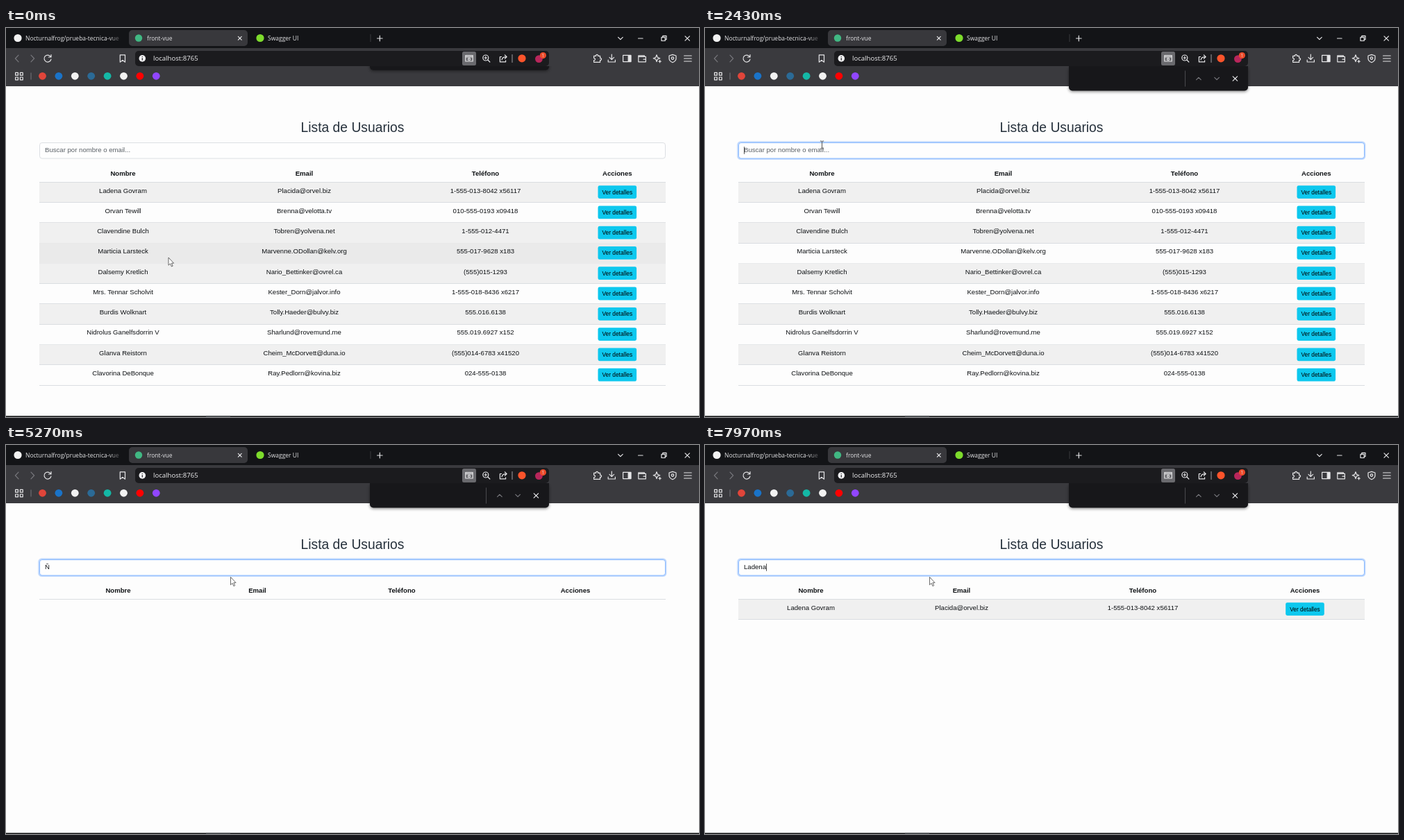
Write an HTML page that moves like this. It is 998 by 561 pixels and loops after 8000 ms.

```html
<!DOCTYPE html>
<html lang="es">
<head>
<meta charset="utf-8">
<title>front-vue</title>
<style>
  html, body { margin: 0; width: 100%; height: 100%; overflow: hidden; background: #fdfdfd; }
  svg { display: block; width: 100%; height: 100%; }
  text { font: 9.6px "Liberation Sans", Arial, sans-serif; fill: #0e1114; }
  .mid { text-anchor: middle; }
  .head { font-weight: bold; }
  .btn { font-size: 8.35px; fill: #000; }
  .title { font-size: 19.3px; fill: #26313c; }
  .hint { fill: #595f65; }
  .ui { font: 8.5px "Open Sans", "Noto Sans", sans-serif; fill: #e4e4e6; }
  .url { font-size: 9.6px; fill: #f0f0f2; }
  .ico { fill: none; stroke: #e6e6e8; stroke-width: 1.2; stroke-linecap: round; stroke-linejoin: round; }
  .dim { stroke: #77777c; }
</style>
</head>
<body>
<svg viewBox="0 0 998 561" preserveAspectRatio="none">
  <defs>
    <clipPath id="under"><rect x="510" y="55" width="290" height="60"/></clipPath>
    <linearGradient id="fade" x1="0" x2="1">
      <stop offset="0" stop-color="#131417" stop-opacity="0"/><stop offset="1" stop-color="#131417"/>
    </linearGradient>
    <filter id="soft" x="-10%" y="-50%" width="120%" height="200%"><feGaussianBlur stdDeviation="2.2"/></filter>
  </defs>
  <rect width="998" height="561" fill="#fdfdfd"/>

  <!-- page -->
  <text class="mid title" x="499" y="150">Lista de Usuarios</text>
  <rect id="ring" x="46.2" y="163.3" width="905.2" height="26.8" rx="5.2" fill="#c2dafe"/>
  <rect id="field" x="48.5" y="165.5" width="901" height="22.6" rx="3.4" fill="#fefefe" stroke="#dcdfe3"/>
  <text id="query" x="56" y="179.4"></text>
  <rect id="caret" y="171.2" width=".8" height="10.6" fill="#222"/>
  <g id="table"></g>

  <!-- tab strip -->
  <rect width="998" height="30" fill="#131417"/>
  <circle cx="17" cy="14.5" r="5.6" fill="#f2f2f2"/>
  <text class="ui" x="28" y="17.6">Nocturnalfrog/prueba-tecnica-vue</text>
  <rect x="148" y="4" width="20" height="22" fill="url(#fade)"/>
  <rect x="168" y="4" width="9" height="22" fill="#131417"/>
  <rect x="177" y="3" width="171" height="23" rx="5" fill="#38383c"/>
  <circle cx="191" cy="14.5" r="5.2" fill="#41b883"/>
  <text class="ui" x="203" y="17.6">front-vue</text>
  <circle cx="366" cy="14.5" r="5.6" fill="#7ddb2c"/>
  <text class="ui" x="377" y="17.6">Swagger UI</text>
  <path d="M525 9V20" stroke="#3a3a3e"/>
  <g class="ico">
    <path d="M334.4 12.4l4.8 4.8m0-4.8l-4.8 4.8M534.5 15h7.6M538.3 11.2v7.6"/>
    <path d="M881.6 13.4l3.3 3.3 3.3-3.3M910.5 15h6.6M978 11.8l6.4 6.4m0-6.4l-6.4 6.4"/>
    <path d="M944 13.3h5.2v5.2H944zM945.8 13v-1.6h5.2v5.2h-1.6"/>
  </g>

  <!-- toolbar -->
  <rect y="29" width="998" height="55" fill="#3a3a3e"/>
  <rect x="186" y="33" width="596" height="22" rx="5" fill="#1b1b1e"/>
  <g class="ico">
    <path class="dim" d="M18 39.2L13.4 44l4.6 4.8M36 39.2l4.6 4.8-4.6 4.8"/>
    <path d="M64.2 41.3a5 5 0 1 0 .7 3.8M65 38.6v3.4h-3.6"/>
    <path d="M164.3 38.8h7.2v10.4l-3.6-2.8-3.6 2.8z"/>
  </g>
  <circle cx="196.3" cy="43.9" r="4.8" fill="#f0f0f2"/>
  <path d="M196.3 43.3v3.2M196.3 41v.9" stroke="#1b1b1e" stroke-width="1.2"/>
  <text class="ui url" x="212" y="47.4">localhost:8765</text>
  <rect x="657" y="34" width="20" height="20" rx="2.5" fill="#6a6a6e"/>
  <g class="ico">
    <path d="M661.8 39.6h10.4v8.4h-10.4zM662 41.6h10"/><circle cx="667" cy="44.9" r="1.5"/>
    <circle cx="690.8" cy="43" r="4"/><path d="M693.8 46l3 3M689 43h3.6M690.8 41.2v3.6"/>
    <path d="M713.6 41.5h-2.2v7.4h8.2v-2M714 46c.4-3 2.4-4.4 6.6-4.4M718.4 39l2.8 2.6-2.8 2.6"/>
    <path d="M729 38.5v11" stroke="#8a8a8e"/>
  </g>
  <circle cx="743" cy="43.8" r="5.6" fill="#fb542b"/>
  <circle cx="767.4" cy="44.6" r="5.4" fill="#b8265b"/>
  <circle cx="773.4" cy="39.6" r="4.6" fill="#ee4b2b"/>
  <text class="mid ui" x="773.4" y="42" style="font-size:6.5px">1</text>
  <g class="ico">
    <path d="M846.6 40.4h3c-.6-2.8 3.6-2.8 3 0h3v3c2.6-.5 2.6 3.3 0 2.9v3h-9v-2.8c2.5.2 2.5-3.4 0-3z"/>
    <path d="M872.3 38v7.2M869 42.4l3.3 3.3 3.3-3.3M867.2 46v3h10.2v-3"/>
    <path d="M888.6 39.4H900v9.2h-11.4z"/><path d="M896.2 40h3.4v8h-3.4z" fill="#e6e6e8"/>
    <path d="M910.8 41.4v-1.6h8.6v1.6M910.8 41.4H921.4v7.4H910.8zM918 45.2h3.4"/>
    <path d="M937 38.8l1.3 3.6 3.5 1.3-3.5 1.3-1.3 3.6-1.3-3.6-3.5-1.3 3.5-1.3zM941.6 46.6v3.2M940 48.2h3.2"/>
    <path d="M960 38.4l5 1.6v4c0 3-2.2 4.6-5 5.8-2.8-1.2-5-2.8-5-5.8v-4z"/><circle cx="960" cy="43.6" r="1.7"/>
    <path d="M976.6 40h10.6M976.6 44h10.6M976.6 48h10.6"/>
  </g>

  <!-- bookmarks -->
  <g class="ico">
    <path d="M13.6 64.4h3.8v3.8h-3.8zM20.4 64.4h3.8v3.8h-3.8zM13.6 71h3.8v3.8h-3.8zM20.4 71h3.8v3.8h-3.8z"/>
  </g>
  <path d="M36 64.5v10" stroke="#77777c"/>
  <g id="marks"></g>

  <!-- find bar -->
  <g clip-path="url(#under)">
    <g id="find">
      <rect x="524" y="56" width="258" height="36" rx="5" fill="#000" opacity=".45" filter="url(#soft)"/>
      <rect x="524" y="50" width="258" height="40.4" rx="5" fill="#17171a"/>
      <path d="M691.5 61.5v23" stroke="#4a4a4e"/>
      <path class="ico dim" d="M707.6 74.6l3.3-3.3 3.3 3.3M733.8 71.4l3.3 3.3 3.3-3.3"/>
      <path class="ico" d="M760.2 69.8l6.4 6.4m0-6.4l-6.4 6.4"/>
    </g>
  </g>

  <rect y="559.4" width="998" height="1.6" fill="#17181a"/>
  <rect x="288" y="559.6" width="35" height="1.4" fill="#4a4c50"/>

  <g id="mouse">
    <path id="arrow" d="M0 0V11.2L2.6 8.8 4.4 13 6.2 12.2 4.4 8.2H7.6Z" fill="#fff" stroke="#444" stroke-width=".8"/>
    <path id="beam" d="M-2.6-5.4H-.6L0-4.8.6-5.4H2.6M0-4.8V5M-2.6 5.6H-.6L0 5 .6 5.6H2.6" fill="none" stroke="#555" stroke-width="1"/>
  </g>
</svg>
<script>
const $ = id => document.getElementById(id);
const LOOP = 8000, TOP = 222.2, ROW = 29.28;

const users = [
  ['Ladena Govram', 'Placida@orvel.biz', '1-555-013-8042 x56117'],
  ['Orvan Tewill', 'Brenna@velotta.tv', '010-555-0193 x09418'],
  ['Clavendine Bulch', 'Tobren@yolvena.net', '1-555-012-4471'],
  ['Marticia Larsteck', 'Marvenne.ODollan@kelv.org', '555-017-9628 x183'],
  ['Dalsemy Kretlich', 'Nario_Bettinker@ovrel.ca', '(555)015-1293'],
  ['Mrs. Tennar Scholvit', 'Kester_Dorn@jalvor.info', '1-555-018-8436 x6217'],
  ['Burdis Wolknart', 'Tolly.Haeder@bulvy.biz', '555.016.6138'],
  ['Nidrolus Ganelfsdorrin V', 'Sharlund@rovemund.me', '555.019.6927 x152'],
  ['Glanva Reistorn', 'Cheim_McDorvett@duna.io', '(555)014-6783 x41520'],
  ['Clavorina DeBonque', 'Ray.Pedlorn@kovina.biz', '024-555-0138']
];
// column centres by number of rows shown
const columns = {
  0: [161.5, 362, 570, 820],
  1: [152.5, 369.5, 630.5, 864],
  5: [159, 415, 684, 879],
  10: [168.5, 429.5, 690.5, 880.3]
};
const typing = [[0, ''], [4700, 'Ñ'], [6130, ''], [6230, 'L'], [6560, 'La'], [6800, 'Lad'],
  [6990, 'Lade'], [7600, 'Laden'], [7670, 'Ladena']];
const caretOn = [[2130, 2630], [3130, 3630], [4130, 5230], [5700, 6130], [6400, 7170], [7870, 8000]];
// time, x, y
const path = [[0, 234, 331], [60, 234, 331], [450, 178, 244], [870, 178, 244], [1350, 168.5, 168.5],
  [3370, 168.5, 168.5], [3730, 323.5, 190.5], [LOOP, 323.5, 190.5]];
const focusAt = 2130;

const clamp = v => Math.max(0, Math.min(1, v));
const ease = v => v * v * (3 - 2 * v);

function mouseAt(t) {
  const i = Math.max(1, path.findIndex(p => p[0] > t));
  const [a, b] = [path[i - 1], path[i]];
  const k = ease(clamp((t - a[0]) / (b[0] - a[0])));
  return [a[1] + (b[1] - a[1]) * k, a[2] + (b[2] - a[2]) * k];
}

const label = (x, y, s, cls = '') => `<text class="mid ${cls}" x="${x}" y="${y}">${s}</text>`;
const line = y => `<rect x="48" y="${Math.floor(y)}" width="902" height="1" fill="#dadde1"/>`;

function tableMarkup(rows, hover) {
  const cols = columns[rows.length] || columns[10];
  let out = ['Nombre', 'Email', 'Teléfono', 'Acciones'].map((s, i) => label(cols[i], 212.5, s, 'head')).join('');
  rows.forEach((user, i) => {
    const y = TOP + i * ROW;
    const fill = i === hover ? '#eaeaea' : i % 2 ? '' : '#f0f0f0';
    if (fill) out += `<rect x="48" y="${y}" width="902" height="${ROW}" fill="${fill}"/>`;
    out += user.map((s, c) => label(cols[c], y + 15.3, s)).join('');
    out += `<rect x="${cols[3] - 27.8}" y="${y + 5}" width="55.6" height="18.8" rx="2.4" fill="#0dc8ee"/>`;
    out += label(cols[3], y + 17.3, 'Ver detalles', 'btn') + line(y + ROW);
  });
  return out + line(TOP);
}

$('marks').innerHTML = ['#e0453a', '#1a73c8', '#f2f2f2', '#2b6a96', '#14b8a6', '#f2f2f2', '#f00', '#9146ff']
  .map((c, i) => `<circle cx="${52.5 + i * 23.4}" cy="69.3" r="5.4" fill="${c}"/>`).join('');

let shown = '';
function render(t) {
  const text = typing.filter(k => k[0] <= t).pop()[1];
  const [x, y] = mouseAt(t);
  const q = text.toLowerCase();
  const rows = users.filter(u => (u[0] + ' ' + u[1]).toLowerCase().includes(q));
  const hover = Math.floor((y - TOP) / ROW);
  const key = q + hover;
  if (key !== shown) {
    shown = key;
    $('table').innerHTML = tableMarkup(rows, hover);
    $('query').textContent = text || 'Buscar por nombre o email...';
    $('query').setAttribute('class', text ? '' : 'hint');
    $('caret').setAttribute('x', 56.2 + (text ? $('query').getComputedTextLength() : 0));
  }
  const focus = clamp((t - focusAt) / 150);
  $('ring').setAttribute('opacity', focus);
  $('field').setAttribute('stroke', focus > .5 ? '#86b7fe' : '#dcdfe3');
  $('caret').setAttribute('opacity', caretOn.some(c => t >= c[0] && t < c[1]) ? 1 : 0);

  const inField = y > 165 && y < 188;
  $('mouse').setAttribute('transform', `translate(${x} ${y})`);
  $('arrow').setAttribute('visibility', inField ? 'hidden' : 'visible');
  $('beam').setAttribute('visibility', inField ? 'visible' : 'hidden');

  const slide = 1 - clamp(t / 200);
  $('find').setAttribute('transform', `translate(0 ${-30 * slide * slide})`);
}

const start = performance.now();
function tick() {
  render((performance.now() - start) % LOOP);
  requestAnimationFrame(tick);
}
tick();
</script>
</body>
</html>
```
